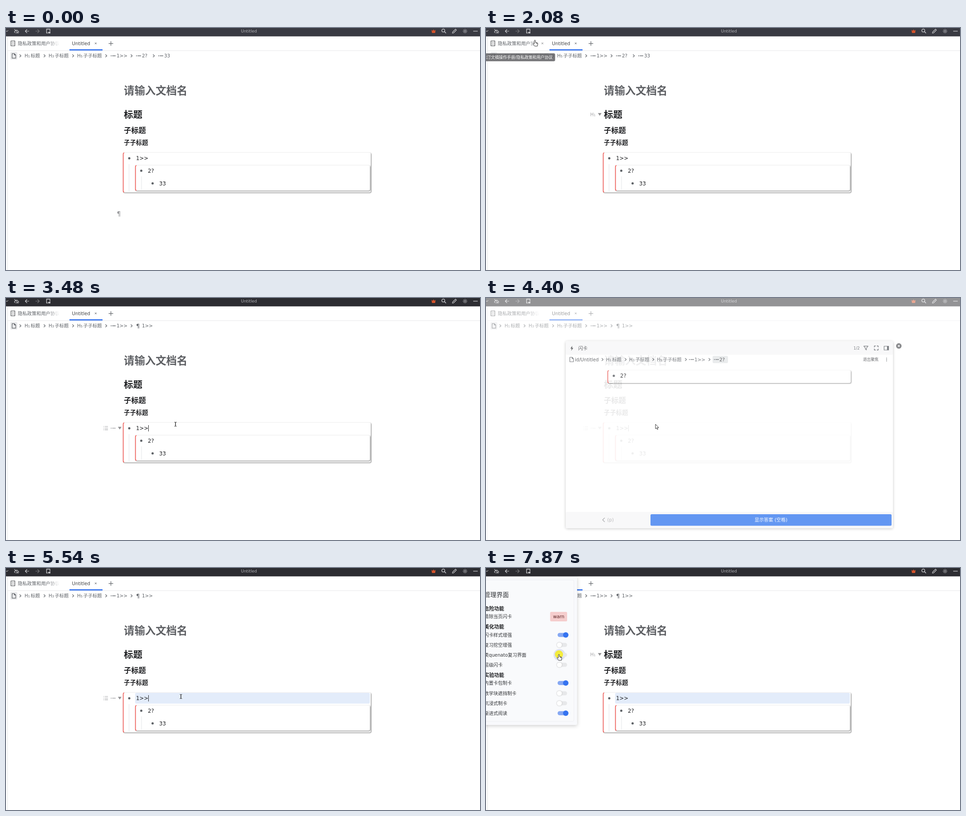
Recreate the animation shown at these times as an HTML page. Size 1046 px wide and 535 px high, loop 8000 ms.

```html
<!DOCTYPE html>
<html lang="zh">
<head>
<meta charset="utf-8">
<style>
html,body{margin:0;width:100%;height:100%;overflow:hidden;background:#fff}
svg{display:block}
text{font-family:"DejaVu Sans","Noto Sans CJK SC","Noto Sans CJK",sans-serif;white-space:pre}
.card{filter:drop-shadow(1px 1px 1px #777)}
</style>
</head>
<body>
<svg id="stage" width="1046" height="535" viewBox="0 0 1046 535"></svg>
<script>
const LOOP = 8000;
const GREY = '#5f6368', INK = '#1f2023', BLUE = '#3573f0';

// Drawing helpers; text is placed by its vertical centre.
const text = (x, y, s, size = 10.2, fill = GREY, extra = '') =>
  `<text x="${x}" y="${y + size * .37}" font-size="${size}" fill="${fill}" ${extra}>${s}</text>`;
const rect = (x, y, w, h, fill, rx = 0, extra = '') =>
  `<rect x="${x}" y="${y}" width="${w}" height="${h}" fill="${fill}" rx="${rx}" ${extra}/>`;
const line = (d, color = GREY, w = 1, fill = 'none') =>
  `<path d="${d}" stroke="${color}" stroke-width="${w}" fill="${fill}" stroke-linejoin="round"/>`;
const shape = (d, fill) => `<path d="${d}" fill="${fill}"/>`;
const dot = (x, y, r, fill, extra = '') => `<circle cx="${x}" cy="${y}" r="${r}" fill="${fill}" ${extra}/>`;
const group = (id, body, extra = '') => `<g id="${id}" ${extra}>${body}</g>`;
const cross = (x, y, r, color, w) => line(`M${x - r} ${y - r}l${2 * r} ${2 * r}m0 ${-2 * r}l${-2 * r} ${2 * r}`, color, w);

const chevron = (x, y) => line(`M${x - 1.6} ${y - 3}l3.2 3l-3.2 3`, GREY, 1.2);
const heading = (x, y, level, color = GREY) => text(x, y, 'H', 10, color) + text(x + 7.4, y + 1.2, level, 7, color);
const itemIcon = (x, y, color = GREY) => dot(x + 1, y, 1, color) + line(`M${x + 3.2} ${y}h7.8`, color, 1.4);
const page = (x, y) => line(`M${x} ${y}h5l3 3v7h-8zm5 0v3h3`, GREY, 1.2);
const arrowDown = y => shape(`M247 ${y - 3}h8l-4 6z`, '#929294');
const bullet = (x, y) => dot(x, y, 2.5, GREY);
const card = (x, y, w, h) => rect(x, y, w, h, '#fff', 3, 'class="card"') +
  line(`M${x + 3} ${y + .5}q-2.3 0-2.3 3v${h - 7}q0 3 2.3 3`, '#f0625d', 1.7);

// Heading trail shared by the page and the dialog.
function trail(x, y) {
  const stops = [[0, 1, '标题', 44], [53 - (x > 100 ? 2 : 0), 3, '子标题', 54], [116 - (x > 100 ? 4 : 0), 5, '子子标题', 64]];
  return stops.map(([dx, level, name, end]) =>
    heading(x + dx, y, level) + text(x + dx + 13.4, y, name, 10.3) + chevron(x + dx + end - (x > 100 && level < 5 ? 1 : 0), y)).join('');
}

function topBar() {
  const c = '#cfcfd2';
  return rect(0, 0, 1046, 18.5, '#393a42', 0, 'id="bar"') +
    rect(81, 0, 24, 18, '#42434a', 2, 'id="iconHover"') +
    text(536, 7, 'Untitled', 8.9, '#b4b4b8', 'text-anchor="middle"') +
    line('M-1 5l3 3l3-3', c) +
    line('M20 10.5q-2-1-1-3q1-1.6 2.6-1.3q1.6-2.8 4.2-.6q.8 1 .8 2q2 .4 1.4 2.2M21 10.7h5M18.5 2.7l9 9', c, 1.1) +
    line('M51 7h-8.5m4-4l-4 4l4 4', c, 1.2) +
    line('M65 7h8.5m-4-4l4 4l-4 4', '#77777b', 1.2) +
    line('M92 11h-2.5v-8.5h7.5v6', c, 1.3) + shape('M93 8.8h5v3h-5z', c) +
    shape('M939 4l2.5 2.2l2-3.2l2 3.2l2.5-2.2l-1 7h-7z', '#d5532a') +
    `<circle cx="965" cy="5.6" r="3.3" fill="none" stroke="${c}" stroke-width="1.3"/>` + line('M967.5 8l3.5 3.6', c, 1.4) +
    line('M985 11.5l.5-2.5l6.5-6.5l2 2l-6.5 6.5z', c, 1.1) +
    `<circle cx="1013" cy="7" r="2" fill="none" stroke="${c}"/>` +
    [0, 45, 90, 135, 180, 225, 270, 315].map(a => `<path d="M1013 3.6v-1.5" stroke="${c}" transform="rotate(${a} 1013 7)"/>`).join('') +
    line('M1031 7h10', c, 1.2);
}

function tabs() {
  return rect(3, 18.5, 1, 517, '#e4e5e7') + rect(4, 49.5, 1042, 1, '#e6e7e9') +
    line('M11 28.5h8.5v11h-8.5z', '#45474b', 1.2) + line('M13 31.5h4.5m-4.5 2.5h4.5m-4.5 2.5h4.5', '#85878a', .8) +
    text(26, 34, '隐私政策和用户协议', 10.3, 'url(#fade)', 'id="tabName"') +
    group('tabClose', cross(124.5, 34, 1.9, '#77797c', .9)) +
    text(145.5, 34, 'Untitled', 10.2, '#3f4144') + cross(198, 34, 1.9, GREY, .9) +
    rect(140, 47, 73, 2.7, BLUE) + line('M226.5 34.3h10m-5-5v10', GREY, 1.2);
}

function crumbs() {
  const y = 61.5;
  return rect(9.5, 53, 15.5, 17, '#e8e9eb', 3) + page(13.5, 56.7) + chevron(31.5, y) + trail(41, y) +
    itemIcon(231, y) + text(244, y, '1&gt;&gt;', 10.4) + chevron(277, y) +
    group('crumbItems', itemIcon(287, y) + text(300, y, '2?', 10.4) + chevron(326, y) + itemIcon(336, y) + text(349, y, '33', 10.4)) +
    group('crumbPara', text(287, y, '¶', 13) + text(300, y, '1&gt;&gt;', 10.4));
}

function documentBody() {
  const bold = 'font-weight="700"';
  const gutterColor = '#a2a3a6';
  const rows = { h1: [191, 1], h3: [226, 3], h5: [253.5, 5] };
  const gutters = Object.entries(rows).map(([id, [y, level]]) => group(id, heading(230, y, level, gutterColor) + arrowDown(y))).join('');
  const list = [284, 287.7, 291.4].map(y => line(`M215 ${y}h1.5m1.5 0h7`, gutterColor, 1.1)).join('');
  return text(260, 138.3, '请输入文档名', 23.4, '#5d5f63', bold) + text(260, 191, '标题', 20.5, INK, bold) +
    text(260, 226, '子标题', 16.3, INK, bold) + text(260, 253.5, '子子标题', 13.4, INK, bold) +
    card(258, 275.5, 547, 88) + rect(285, 276, 518, 23.7, '#e3ecfa', 3, 'id="highlight"') +
    bullet(272, 288) + rect(271, 301, 1, 61, '#e4e5e7') + text(287, 287.5, '1&gt;&gt;', 11.7, INK) +
    rect(314, 281, 1, 14, '#222', 0, 'id="caret"') +
    card(285, 303.5, 518, 56) + bullet(298.5, 315.5) + rect(298.5, 328, 1, 30, '#e4e5e7') +
    text(313, 315.5, '2?', 11.7, INK) + bullet(323.5, 343.5) + text(338, 343.5, '33', 11.7, INK) +
    gutters + group('li', list + itemIcon(231, 287.7, gutterColor) + arrowDown(287.7)) +
    group('para', text(244.5, 410, '¶', 14, '#929396'));
}

function panel() {
  const toggle = (y, on) => on
    ? rect(158, y - 4.5, 22, 9, '#86a8f3', 4.5) + dot(176, y, 6, BLUE)
    : rect(158, y - 4.5, 21, 9, '#e7e8ea', 4.5) + dot(162, y, 5.6, '#fff', 'style="filter:drop-shadow(0 .5px 1px #aaa)"');
  const rows = [[148, '闪卡样式增强', 1], [170, '复习挖空增强', 0], [192, '类quenato复习界面', 0], [214, '层级闪卡', 0],
    [254.3, '内置卡包制卡', 1], [277, '数学块遮挡制卡', 0], [299, '沉浸式制卡', 0], [321, '渐进式阅读', 1]];
  const heads = [[89.5, '危险功能'], [130, '美化功能'], [236.5, '实验功能']];
  return rect(-10, 19, 211, 328, '#f8f9fc', 3, 'style="filter:drop-shadow(0 2px 4px #0003)"') +
    rect(-10, 26.5, 204, 312.5, '#f9fafc', 3, 'stroke="#eeeff3"') +
    text(-4, 59, '管理界面', 13.6, '#333538') +
    heads.map(([y, s]) => text(-4, y, s, 11, INK, 'font-weight="700"')).join('') +
    text(-4, 107.5, '清除当页闪卡', 10.2, '#333538') +
    rect(141.5, 97, 37.5, 21, '#f5cdcd', 2.5) + text(148, 107.5, 'warn', 10.2, '#5c2424') +
    group('ring', dot(162, 192, 13, '#dfe2ee')) +
    rows.map(([y, s, on]) => text(-4, y, s, 10.2, '#333538') + toggle(y, on)).join('');
}

function dialog() {
  const y = 136;
  return rect(176, 95.5, 722, 413.5, '#fff', 3, 'style="filter:drop-shadow(0 1px 3px #0004)"') +
    rect(176, 95.5, 722, 30, '#f7f7f8', 3) + rect(176, 473, 722, 36, '#f7f7f8', 3) +
    shape('M190.5 105.5l-4.2 6.2h2.7l-1 5l4.6-6.5h-2.8z', '#444649') + text(203.5, 111, '闪卡', 10.3, '#3f4144') +
    text(811, 110.5, '1/2', 8.5) +
    line('M833.7 106.3h9.4l-3.6 4.5v4l-2.2-1.3v-2.7z', GREY, 1.2) +
    line('M857 109v-3h3m2.5 0h3v3m0 3v3h-3m-2.5 0h-3v-3', GREY, 1.3) +
    line('M878.5 106.5h10v8.5h-10z', GREY, 1.2) + shape('M885 106.5h3.5v8.5h-3.5z', GREY) +
    dot(911, 106, 6, '#6a6b6e') + cross(911, 106, 2.2, '#fff', 1.3) +
    page(185, 131) + text(196, y, 'id/Untitled', 10.1, '#4a4c50') + chevron(257, y) + trail(265, y) +
    itemIcon(448, y) + text(460, y, '1&gt;&gt;', 10.4) + chevron(493, y) +
    rect(500, 128, 34, 16, '#e6e8ea', 3) + itemIcon(503, y) + text(515, y, '2?', 10.4, '#3f4144') +
    text(832, 135.7, '退出聚焦', 8.6, '#4a4c50') + [132.8, 136, 139.2].map(cy => dot(884, cy, .9, GREY)).join('') +
    card(268, 160, 537, 28) + bullet(282, 172) + text(296, 172, '2?', 11.7, INK) +
    line('M262 486l-4.7 4.5l4.7 4.5', '#a0a1a4', 1.5) + text(267.5, 490.5, '(p)', 10.2, '#a9aaad') +
    rect(363, 478, 532, 25.5, '#4080f0', 2.5) +
    text(629, 490.7, '显示答案 (空格)', 10.2, '#fff', 'text-anchor="middle"');
}

const tips = () =>
  group('tabTip', rect(-10, 56, 162.5, 17.5, '#68686b', 3) + text(147, 64.5, '禾汀文稿操作手册/隐私政策和用户协议', 8.9, '#fff', 'text-anchor="end"')) +
  group('iconTip', shape('M89 22.5l4-4l4 4z', '#68686b') + rect(39.5, 22, 64, 18.5, '#68686b', 3) + text(71.5, 31, '打开闪卡菜单', 9, '#fff', 'text-anchor="middle"'));

const pointers = () => group('pointer',
  group('halo', dot(0, 0, 9, '#f6ec1c', 'opacity=".85"')) +
  group('arrow', line('M0 0v10.2l2.3-2.1l1.6 3.6l1.7-.8l-1.6-3.4h3.1z', '#222', .9, '#fff')) +
  group('ibeam', line('M-2.5-4.5h2q.5 0 .5.5v8q0 .5-.5.5h-2m5 0h-2q-.5 0-.5-.5v-8q0-.5.5-.5h2', '#333', 1)) +
  group('hand', line('M-1.3 7.5v-6.3q0-1.3 1.2-1.3t1.2 1.3v3.8l4 .9q1.3.4 1.1 1.8l-.8 5.4h-6l-3.2-4.3q-.7-1.2.2-1.7q1-.4 2.3 1.2zM3 5.5v2m2-1.5v2', '#222', .9, '#fff')));

document.getElementById('stage').innerHTML =
  `<defs><linearGradient id="fade" gradientUnits="userSpaceOnUse" x1="92" x2="118"><stop stop-color="#5f6368"/><stop offset="1" stop-color="#5f6368" stop-opacity="0"/></linearGradient></defs>` +
  rect(0, 0, 1046, 535, '#fff') + tabs() + crumbs() + documentBody() + topBar() + group('panel', panel()) + tips() +
  rect(0, 0, 1046, 535, '#fff', 0, 'id="scrim"') + group('dialog', dialog()) + pointers();

const el = id => document.getElementById(id);
const show = (id, amount) => el(id).setAttribute('opacity', +amount);
const ramp = (t, from, to) => Math.min(1, Math.max(0, (t - from) / (to - from)));
const within = (t, ...spans) => spans.some(([from, to]) => t >= from && t < to);

// Pointer path: time, x, y.
const path = [
  [130, 1022, 515], [330, 640, 400], [520, 300, 190], [650, 157, 54], [800, 280, 140], [930, 335, 192],
  [1000, 335, 192], [1280, 338, 249], [1740, 338, 249], [1950, 200, 110], [2080, 108, 27], [2200, 108, 27],
  [2400, 94, 6], [2600, 94, 6], [2670, 115, 38], [2760, 230, 160], [3000, 374, 279], [4860, 374, 279],
  [4880, 386, 287], [5020, 386, 287], [5080, 386, 285], [5600, 386, 284], [5900, 330, 215], [6150, 240, 150],
  [6220, 112, 30], [6290, 97, 5], [6950, 97, 5], [7150, 130, 100], [7420, 157, 190], [7610, 157, 190], [7680, 161, 191]
];
const gutterTimes = [[0, 'para'], [330, ''], [900, 'h1'], [1140, 'h5'], [1780, 'h3'], [1830, 'h1'], [2950, 'li'], [5800, 'h3'], [5980, 'h1']];

function pointerAt(t) {
  const next = path.findIndex(p => p[0] > t);
  if (next < 1) return (next ? path[path.length - 1] : path[0]).slice(1);
  const [t0, x0, y0] = path[next - 1], [t1, x1, y1] = path[next];
  const k = ramp(t, t0, t1);
  return [x0 + (x1 - x0) * k, y0 + (y1 - y0) * k];
}

function pointerKind(x, y, panelOpen, dialogOpen) {
  if (dialogOpen) return 'arrow';
  if (y < 18) return 'hand';
  if (panelOpen && x < 201) return x > 150 && y > 185 ? 'hand' : 'arrow';
  if (x < 135 && y < 50) return 'hand';
  return x > 258 && x < 806 && y > 120 && y < 420 ? 'ibeam' : 'arrow';
}

function draw(t) {
  const panelOpen = within(t, [2550, 3280], [6620, LOOP]);
  const shown = ramp(t, 4340, 4415) - ramp(t, 5340, 5415);
  const [x, y] = pointerAt(t);
  const kind = pointerKind(x, y, panelOpen, shown > 0);
  const onTab = !panelOpen && x < 135 && y > 18 && y < 50;

  el('bar').setAttribute('fill', t < 2550 ? '#393a42' : '#2c2c31');
  show('iconHover', within(t, [2380, 2760], [6280, 7000]) ? .55 : 0);
  show('panel', panelOpen);
  show('ring', t > 7350);
  show('tabClose', onTab);
  show('crumbItems', t < 3340);
  show('crumbPara', t >= 3340);
  show('highlight', t >= 5350);
  show('caret', within(t, [3280, 3810], [4340, 5880], [6410, 6620]));

  const gutter = gutterTimes.filter(g => g[0] <= t).pop()[1];
  for (const id of ['para', 'h1', 'h3', 'h5', 'li']) show(id, id === gutter);

  show('tabTip', .9 * (ramp(t, 1990, 2075) - ramp(t, 2200, 2260)) + (within(t, [6215, 6275]) ? .5 : 0));
  const tip = ramp(t, 2400, 2480) - ramp(t, 2760, 2860) + ramp(t, 6300, 6400) - ramp(t, 6950, 7050);
  const scale = .85 + .15 * tip;
  show('iconTip', tip);
  el('iconTip').setAttribute('transform', `translate(71 31) scale(${scale}) translate(-71 -31)`);

  show('scrim', .6 * shown);
  show('dialog', shown);

  show('pointer', t >= 130);
  el('pointer').setAttribute('transform', `translate(${x} ${y})`);
  for (const id of ['arrow', 'ibeam', 'hand']) show(id, id === kind);
  show('halo', within(t, [2550, 2640], [3280, 3400], [6620, 6740], [7870, LOOP]));
}

const start = performance.now();
function tick() {
  draw((performance.now() - start) % LOOP);
  requestAnimationFrame(tick);
}
tick();
</script>
</body>
</html>
```
